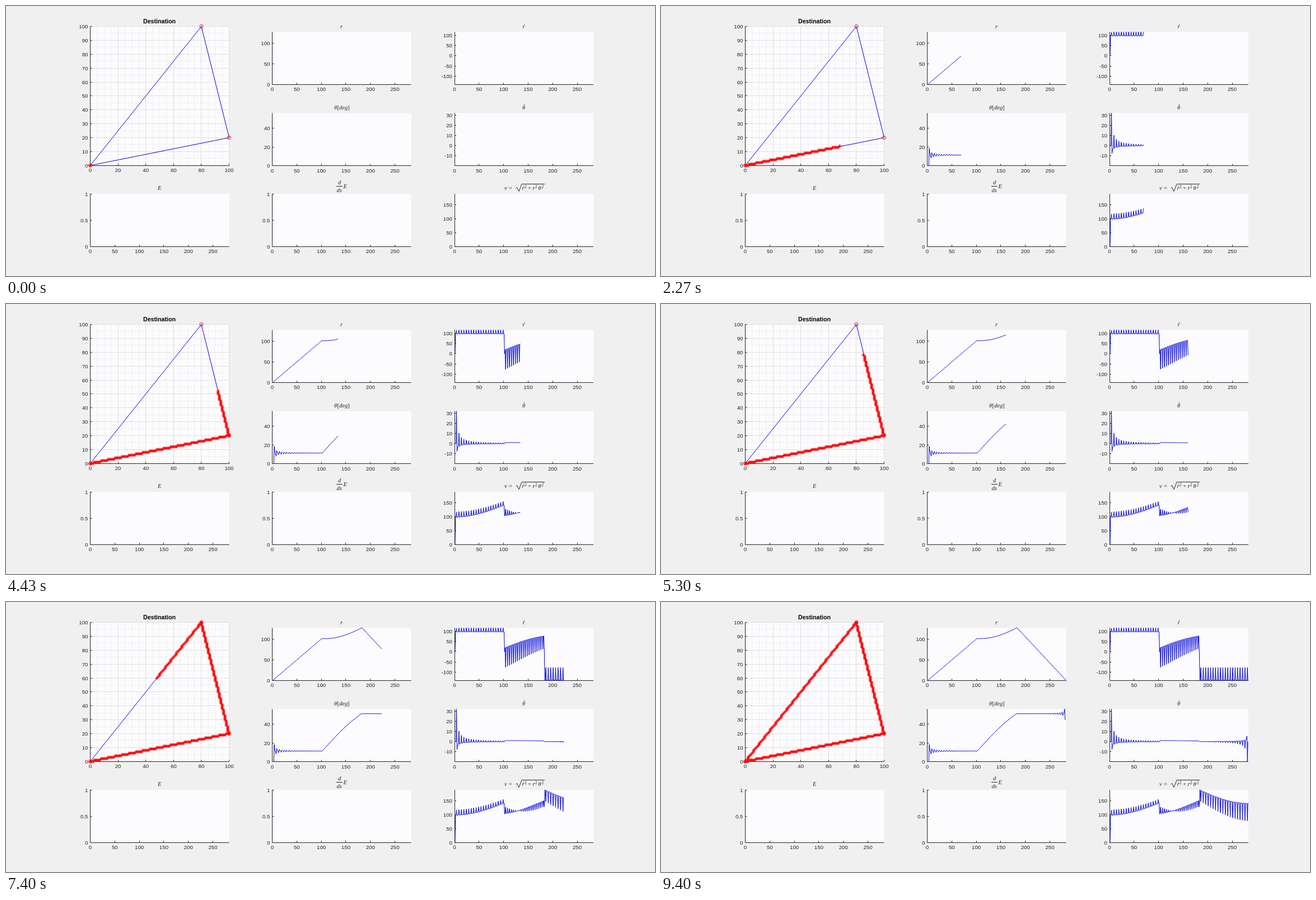
Recreate the animation shown at these times as an HTML page. Size 1159 px wide and 483 px high, loop 9430 ms.

```html
<!DOCTYPE html>
<html lang="en">
<head>
<meta charset="utf-8">
<title>Triangle path in polar coordinates</title>
<style>
  html, body { margin: 0; width: 100%; height: 100%; overflow: hidden; background: #f0f0f0; }
  svg { display: block; width: 1159px; height: 483px; }
  text { fill: #262626; font: 9.7px "Liberation Sans", Arial, sans-serif; }
  .title { font-weight: bold; font-size: 10.67px; fill: #000; }
  .math { font: italic 10.5px "Liberation Serif", "Times New Roman", serif; }
  .upright { font-style: normal; }
  .sup { font-size: 7.5px; font-style: normal; }
  .axis { fill: none; stroke: #262626; }
  .grid { fill: none; stroke: #dedee2; }
  .minor { fill: none; stroke: #cfcfcf; stroke-dasharray: 1 3; }
  .curve { fill: none; stroke: #0000d8; stroke-linejoin: round; }
  .mark { fill: none; stroke: #f00; }
</style>
</head>
<body>
<svg id="stage" viewBox="0 0 1159 483"></svg>
<script>
(() => {
const stage = document.getElementById('stage');
const LOOP = 9430;

function add(tag, attrs, content = '') {
  const node = document.createElementNS('http://www.w3.org/2000/svg', tag);
  for (const key in attrs) node.setAttribute(key, attrs[key]);
  node.textContent = content;
  return stage.appendChild(node);
}
const path = (cls, d) => add('path', { class: cls, d });
const label = (x, y, content, cls = '', anchor = 'middle') =>
  add('text', { x, y, class: cls, 'text-anchor': anchor }, content);
const math = (x, y, content, cls = '') => label(x, y, content, 'math ' + cls, 'start');
const range = (from, to, step) =>
  Array.from({ length: Math.floor((to - from) / step + 1e-6) + 1 }, (_, i) => from + i * step);
const crisp = v => Math.floor(v) + 0.5;

// Axes: pixel box, data limits and tick values; returns the data-to-pixel mapping.
function axes({ x, y, w = 248, h = 94, xMax = 283, yMin = 0, yMax, xTicks = range(0, 250, 50), yTicks, grid }) {
  const bottom = y + h;
  const px = v => x + v / xMax * w;
  const py = v => bottom - (v - yMin) / (yMax - yMin) * h;
  const vLine = v => `M${crisp(px(v))} ${y}V${bottom}`;
  const hLine = v => `M${x} ${crisp(py(v))}H${x + w}`;
  add('rect', { x, y, width: w, height: h, fill: '#fcfcfe' });
  if (grid) {
    const fine = range(5, 95, 5);
    path('minor', fine.filter(v => v % 20).map(vLine).join('') + fine.filter(v => v % 10).map(hLine).join(''));
    path('grid', xTicks.slice(1).map(vLine).join('') + yTicks.slice(1).map(hLine).join(''));
  }
  path('axis', `M${crisp(x)} ${y}V${crisp(bottom)}H${x + w}` +
    xTicks.map(v => `M${crisp(px(v))} ${bottom}v-3`).join('') +
    yTicks.map(v => `M${x} ${crisp(py(v))}h3`).join(''));
  xTicks.forEach(v => label(px(v), bottom + 12, v));
  yTicks.forEach(v => label(x - 4, py(v) + 3.5, v, '', 'end'));
  return { px, py };
}

// Rasterised route: one grid point per step along the longer side of each leg.
const corners = [[0, 0], [100, 20], [80, 100], [0, 0]];
const route = [];
for (let leg = 0; leg < 3; leg++) {
  const [ax, ay] = corners[leg], [bx, by] = corners[leg + 1];
  const steps = Math.max(Math.abs(bx - ax), Math.abs(by - ay));
  for (let i = 0; i <= steps; i++) {
    const at = (a, b) => Math.ceil(a + (b - a) * i / steps - 0.5);
    route.push([at(ax, bx), at(ay, by)]);
  }
}

// Polar quantities; the angle is undefined at the origin.
const radius = route.map(p => Math.hypot(...p));
const angle = route.map(([x, y]) => x || y ? Math.atan2(y, x) : NaN);
const rate = list => list.map((v, i) => i ? (v - list[i - 1]) * 100 : 0);
const radiusRate = rate(radius);
const angleRate = rate(angle);
const degrees = angle.map(a => a * 180 / Math.PI);
const speed = radius.map((r, i) => Math.hypot(radiusRate[i], r));
const defined = list => list.filter(v => !isNaN(v));
const highest = list => Math.max(...defined(list));
const lowest = list => Math.min(...defined(list));

const COLS = [150.5, 475.5, 801];
const ROWS = [46.3, 191.5, 336];

const plan = axes({
  x: COLS[0], y: 36.5, h: 248.8, xMax: 100, yMax: 100,
  xTicks: range(0, 100, 20), yTicks: range(0, 100, 10), grid: true
});
axes({ x: COLS[0], y: ROWS[2], yMax: 1, yTicks: [0, 0.5, 1] });
axes({ x: COLS[1], y: ROWS[2], yMax: 1, yTicks: [0, 0.5, 1] });

const charts = [
  { data: radius, col: 1, row: 0, yMin: 0, yTicks: [0, 50, 100] },
  { data: radiusRate, col: 2, row: 0, yMin: lowest(radiusRate), yTicks: range(-100, 100, 50) },
  { data: degrees, col: 1, row: 1, yMin: 0, yTicks: [0, 20, 40] },
  { data: angleRate, col: 2, row: 1, yMin: lowest(angleRate), yTicks: range(-10, 30, 10) },
  { data: speed, col: 2, row: 2, yMin: 0, yTicks: range(0, 150, 50) }
].map(({ data, col, row, yMin, yTicks }) => {
  const { px, py } = axes({ x: COLS[col], y: ROWS[row], yMin, yMax: highest(data), yTicks });
  return {
    line: add('polyline', { class: 'curve' }),
    points: data.map((v, i) => isNaN(v) ? '' : `${px(i + 1).toFixed(2)},${py(v).toFixed(2)}`)
  };
});

// Titles
label(274, 31, 'Destination', 'title');
math(597, 40, 'r');
math(922.5, 40, 'r');
math(586, 185, 'θ');
math(591.5, 185, '[', 'upright');
math(595, 185, 'deg');
math(610, 185, ']', 'upright');
math(922, 185, 'θ');
math(271, 329, 'E');
math(593, 319, 'd');
math(590.5, 332.5, 'ds');
math(602.5, 326, 'E');
path('axis', 'M590 322.5H601');
math(890, 329, 'v');
math(898, 329, '=', 'upright');
math(921.5, 329, 'r');
math(926, 326, '2', 'sup');
math(932, 329, '+', 'upright');
math(940.5, 329, 'r');
math(945, 326, '2', 'sup');
math(950.5, 329, 'θ');
math(956.5, 326, '2', 'sup');
path('axis', 'M910.5 326l2-1.5l3.5 7l5-13H962');
[[925.5, 33], [925.5, 176.5], [924.5, 322]].forEach(([cx, cy]) =>
  add('circle', { cx, cy, r: 0.7, fill: '#262626' }));

// Route outline, corner rings and the growing trail of stars
const place = ([x, y]) => [plan.px(x), plan.py(y)];
add('polyline', { class: 'curve', points: corners.map(place).join(' ') });
corners.slice(0, 3).map(place).forEach(([cx, cy]) => add('circle', { class: 'mark', cx, cy, r: 3 }));
const trail = path('mark', '');
const stars = route.map(p => {
  const [x, y] = place(p).map(v => v.toFixed(1));
  return `M${x} ${y}m-3 0h6m-3-3v6m-2.1-5.1l4.2 4.2m0-4.2l-4.2 4.2`;
});

let shown = -1;
function show(time) {
  // Steps advance 30 times a second, timed in hundredths.
  const ticks = Math.floor(time % LOOP / 10);
  const step = Math.min(Math.floor((ticks + 0.5) * 0.3), route.length - 1);
  if (step === shown) return;
  shown = step;
  trail.setAttribute('d', stars.slice(0, step + 1).join(''));
  for (const { line, points } of charts)
    line.setAttribute('points', points.slice(0, step + 1).join(' '));
}
function play() {
  show(performance.now());
  requestAnimationFrame(play);
}
play();
})();
</script>
</body>
</html>
```
